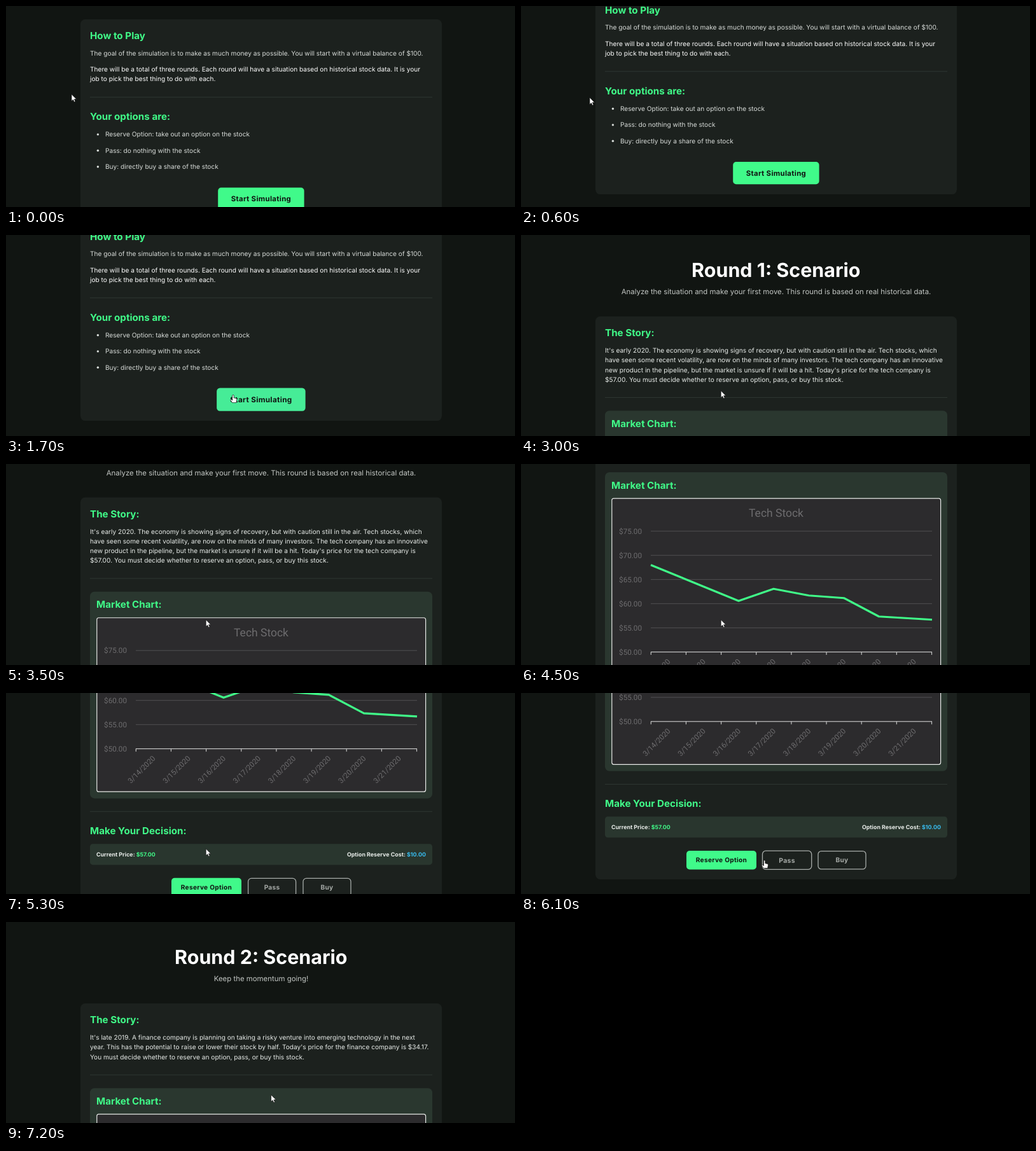
An HTML page that plays this animation: 800x316 px, repeating every 7.3 s.

```html
<!DOCTYPE html>
<html lang="en">
<head>
<meta charset="utf-8">
<title>Stock simulation</title>
<style>
  html, body { margin: 0; height: 100%; overflow: hidden; background: #111512; }
  svg { display: block; width: 100vw; height: 100vh; }
  text { font: 10.15px Inter, sans-serif; fill: #d8dcd9; white-space: pre; text-rendering: geometricPrecision; }
  .title { font-size: 30.48px; font-weight: 700; fill: #fff; text-anchor: middle; }
  .sub { font-size: 11.42px; fill: #c2c6c3; text-anchor: middle; }
  .head { font-size: 15.2px; font-weight: 700; fill: #40fa88; }
  .bright { fill: #fff; }
  .story { fill: #e8ece9; }
  .price { font-size: 8.88px; font-weight: 700; fill: #e8ece9; }
  .end { text-anchor: end; }
  .green { fill: #40fa88; }
  .blue { fill: #38bdf0; }
  .axis { font: 11.7px Roboto, sans-serif; fill: #6d6c6e; }
  .mid { text-anchor: middle; }
  .name { font-size: 17.5px; }
  .btn { transform-box: fill-box; transform-origin: center; }
  .btn text { font-weight: 700; letter-spacing: .317px; text-anchor: middle; fill: #111512; }
  .btn rect { fill: #40fa8a; }
  .btn.hover { transform: scale(1.03); }
  .btn.hover rect { fill: #46ec97; }
  .btn.outline rect { fill: none; stroke: #a6aba8; stroke-width: 1.3; }
  .btn.outline text { fill: #a6aaa7; }
</style>
</head>
<body>
<svg viewBox="0 0 800 316">
  <g id="pages"></g>
  <g id="cursor" stroke="#111" stroke-width=".7" stroke-linejoin="round" fill="#fff">
    <path id="arrow" d="M0 0V10.8L2.5 8.6L4.2 12.3L6 11.5L4.4 7.9H7.8Z"/>
    <path id="hand" d="M-1.2 1Q0-.6 1.2 1V5L4.6 5.8Q6 6.2 5.8 7.8L5 12.6H-1.4L-4.2 8.6Q-4.4 7.2-2.8 7.6L-1.2 8.8Z"/>
  </g>
</svg>
<script>
const LOOP = 7300, CENTER = 401;
const $ = id => document.getElementById(id);

const text = (x, y, str, cls = '', extra = '') =>
  `<text x="${x}" y="${y}" class="${cls}" ${extra}>${str}</text>`;
const rect = (x, y, w, h, r, fill, extra = '') =>
  `<rect x="${x}" y="${y}" width="${w}" height="${h}" rx="${r}" fill="${fill}" ${extra}/>`;
const card = (top, bottom) => rect(117, top, 568, bottom - top, 7.5, '#1c211e');
const divider = y => rect(132, y - .4, 538, .9, 0, '#303934');
const lines = (y, rows, cls) => rows.map((row, i) => text(132, y + i * 15.16, row, cls)).join('');
const button = (x, y, w, h, label, size, cls = '') =>
  `<g class="btn ${cls}" data-box="${x},${y},${w},${h}">${rect(x, y, w, h, 5, '')}` +
  text(x + w / 2, y + h / 2 + size * .364, label, '', `style="font-size:${size}px"`) + '</g>';

function intro() {
  const options = ['Reserve Option: take out an option on the stock',
    'Pass: do nothing with the stock', 'Buy: directly buy a share of the stock'];
  return card(21, 336.5) +
    text(132, 52.1, 'How to Play', 'head') +
    text(132, 77.8, 'The goal of the simulation is to make as much money as possible. You will start with a virtual balance of $100.') +
    lines(103, ['There will be a total of three rounds. Each round will have a situation based on historical stock data. It is your',
      'job to pick the best thing to do with each.'], 'bright') +
    divider(143.2) +
    text(132, 179.3, 'Your options are:', 'head') +
    options.map((str, i) => {
      const y = 205.3 + i * 25.4;
      return `<circle cx="144.4" cy="${y - 3.4}" r="1.7" fill="#d8dcd9"/>` + text(156, y, str);
    }).join('') +
    button(333.2, 285.5, 135.4, 35.2, 'Start Simulating', 11.42);
}

function chart() {
  let out = rect(142.8, 317.3, 516.8, 309, 3, '#2c2b2d', 'stroke="#e8eae8" stroke-width="1.2"') +
    text(CENTER, 346.7, 'Tech Stock', 'axis name mid');
  for (let i = 0; i < 6; i++) {
    const y = 368.8 + i * 38;
    out += text(190, y + 4.1, `$${75 - i * 5}.00`, 'axis end') +
      rect(204, y - .6, 442, 1.2, 0, i < 5 ? '#4a494b' : '#c4c4c4');
  }
  for (let i = 0; i < 9; i++) {
    const x = 204.3 + i * 55.15;
    out += rect(x - .6, 558.8, 1.2, 4.5, 0, '#c4c4c4');
    if (i < 8) out += text(0, 4, `3/${14 + i}/2020`, 'axis mid', `transform="translate(${x + 8.7} 591.5) rotate(-45)"`);
  }
  return out + '<path d="M204 422L342 478.5L397 459.5L452.5 470L507.5 474L562.5 503L646 508" fill="none" stroke="#40fa88" stroke-width="3.2" stroke-linejoin="round"/>';
}

function round(number, subtitle, story) {
  const shift = (story.length - 4) * 15.1;
  return text(CENTER - .2, 66.1, `Round ${number}: Scenario`, 'title') +
    text(CENTER, 93.1, subtitle, 'sub') +
    card(128, 807 + shift) +
    text(132, 159.2, 'The Story:', 'head') +
    lines(185.3, story, 'story') +
    `<g transform="translate(0 ${shift})">` +
    divider(255.4) +
    rect(132, 276.3, 538, 360.5, 7, '#2a372f') +
    text(142, 301.9, 'Market Chart:', 'head') +
    chart() +
    divider(657.4) +
    text(132, 693.3, 'Make Your Decision:', 'head') +
    rect(132, 708.3, 538, 33, 4.5, '#29362e') +
    text(142, 728.1, 'Current Price: <tspan class="green">$57.00</tspan>', 'price') +
    text(660, 728.1, 'Option Reserve Cost: <tspan class="blue">$10.00</tspan>', 'price end') +
    button(260, 762, 110, 29.5, 'Reserve Option', 10.15) +
    button(380.6, 762.6, 75, 28.3, 'Pass', 10.15, 'outline') +
    button(467, 762.6, 75, 28.3, 'Buy', 10.15, 'outline') + '</g>';
}

$('pages').innerHTML = [
  intro(),
  round(1, 'Analyze the situation and make your first move. This round is based on real historical data.', [
    "It's early 2020. The economy is showing signs of recovery, but with caution still in the air. Tech stocks, which",
    'have seen some recent volatility, are now on the minds of many investors. The tech company has an innovative',
    "new product in the pipeline, but the market is unsure if it will be a hit. Today's price for the tech company is",
    '$57.00. You must decide whether to reserve an option, pass, or buy this stock.']),
  round(2, 'Keep the momentum going!', [
    "It's late 2019. A finance company is planning on taking a risky venture into emerging technology in the next",
    "year. This has the potential to raise or lower their stock by half. Today's price for the finance company is $34.17.",
    'You must decide whether to reserve an option, pass, or buy this stock.'])
].map(page => `<g>${page}</g>`).join('');
const pages = [...$('pages').children];

// Keys are [time, value, ...]; the pages cut over at these times.
const CUTS = [0, 2000, 6800];
const SCROLL = [
  [[200, 0], [350, 14], [550, 39], [750, 44.4]],
  [[3120, 0], [3200, 10], [3900, 162.4], [4500, 263], [5300, 471], [5550, 514]],
  [[0, 0]]
];
const POINTER = [[0, 103, 138.7], [850, 110, 146], [1150, 230, 205], [1500, 357, 251],
  [2050, 357, 251], [2400, 314.2, 244.8], [5700, 314.2, 244.8], [6300, 416.6, 271.7]];

function at(keys, t) {
  const i = keys.findIndex(key => key[0] > t);
  if (i < 0) return keys[keys.length - 1].slice(1);
  if (i === 0) return keys[0].slice(1);
  const a = keys[i - 1], b = keys[i], k = (t - a[0]) / (b[0] - a[0]);
  return a.slice(1).map((v, j) => v + (b[j + 1] - v) * k);
}

function draw(now) {
  const t = now % LOOP;
  const current = CUTS.filter(cut => cut <= t).length - 1;
  const [scroll] = at(SCROLL[current], t);
  const [x, y] = at(POINTER, t);
  pages.forEach((page, i) => page.style.display = i === current ? '' : 'none');
  pages[current].setAttribute('transform', `translate(0 ${-scroll})`);

  let over = false;
  for (const btn of pages[current].querySelectorAll('.btn')) {
    const [bx, by, w, h] = btn.dataset.box.split(',').map(Number);
    const hit = x > bx && x < bx + w && y + scroll > by && y + scroll < by + h;
    btn.classList.toggle('hover', hit);
    over = over || hit;
  }
  $('cursor').setAttribute('transform', `translate(${x} ${y})`);
  $('arrow').style.display = over ? 'none' : '';
  $('hand').style.display = over ? '' : 'none';
  requestAnimationFrame(() => draw(performance.now()));
}
draw(0);
</script>
</body>
</html>
```
